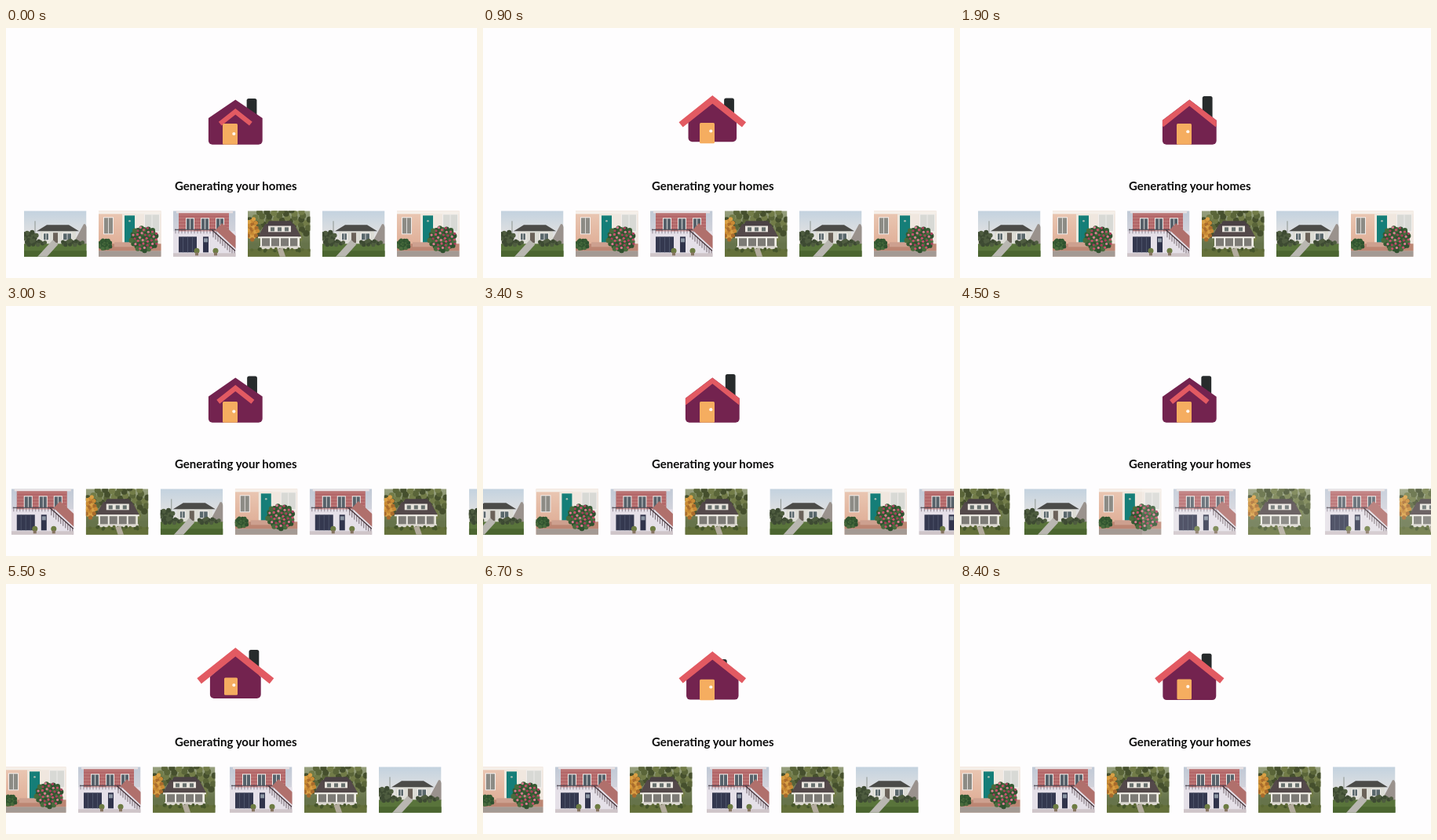
Write an HTML page with a canvas that moves like this. It is 600x319 px and loops after 8500 ms.

```html
<!DOCTYPE html>
<html lang="en">
<head>
<meta charset="utf-8">
<title>Generating your homes</title>
<style>
  html, body { margin: 0; width: 100%; height: 100%; overflow: hidden; background: #fefdfe; }
  canvas { display: block; width: 600px; height: 319px; }
  p {
    position: absolute; left: -7.2px; top: 192px; width: 600px; margin: 0;
    font: bold 15px/18px Lato, sans-serif; text-align: center; color: #0b0b0b;
  }
</style>
</head>
<body>
<canvas id="stage" width="600" height="319"></canvas>
<p>Generating your homes</p>
<script>
const ctx = document.getElementById('stage').getContext('2d');
const LOOP = 8500, BOUNCE = 1475, BACKGROUND = '#fefdfe';
const PHOTO_W = 79.5, PHOTO_H = 58.5, PHOTO_STEP = 95;

// Timing helpers
const ramp = (t, from, to) => Math.min(1, Math.max(0, (t - from) / (to - from)));
const easeOut = u => u * (2 - u);
const easeInOut = u => (1 - Math.cos(Math.PI * u)) / 2;
const pulse = (u, skew = 1) => Math.sin(Math.PI * u ** skew);

// Drawing helpers
function rect(color, x, y, w, h) {
  ctx.fillStyle = color;
  ctx.fillRect(x, y, w, h);
}
function rounded(color, x, y, w, h, radius) {
  ctx.fillStyle = color;
  ctx.beginPath();
  ctx.roundRect(x, y, w, h, radius);
  ctx.fill();
}
function dot(color, x, y, radius) {
  ctx.fillStyle = color;
  ctx.beginPath();
  ctx.arc(x, y, radius, 0, 7);
  ctx.fill();
}
// A slab whose upper edge is narrower than its lower one by `inset` on each side.
function roof(color, x, y, w, h, inset) {
  ctx.fillStyle = color;
  ctx.beginPath();
  ctx.moveTo(x + inset, y);
  ctx.lineTo(x + w - inset, y);
  ctx.lineTo(x + w, y + h);
  ctx.lineTo(x, y + h);
  ctx.fill();
}
function line(color, width, x1, y1, x2, y2) {
  ctx.strokeStyle = color;
  ctx.lineWidth = width;
  ctx.beginPath();
  ctx.moveTo(x1, y1);
  ctx.lineTo(x2, y2);
  ctx.stroke();
}
function backdrop(top, bottom) {
  const fill = ctx.createLinearGradient(0, 0, 0, 42);
  fill.addColorStop(0, top);
  fill.addColorStop(1, bottom);
  rect(fill, 0, 0, PHOTO_W, PHOTO_H);
}
// Leaves or petals spread in a sunflower spiral inside an ellipse.
function scatter(colors, count, cx, cy, rx, ry, size) {
  for (let i = 0; i < count; i++) {
    const r = Math.sqrt((i + 0.5) / count), angle = i * 2.4;
    dot(colors[i % colors.length], cx + Math.cos(angle) * r * rx, cy + Math.sin(angle) * r * ry, size);
  }
}
function pane(x, y, w, h, glass) {
  rect('#f3efed', x - 1, y - 1, w + 2, h + 2);
  rect(glass, x, y, w, h);
  rect('#f3efed', x + w / 2 - 0.4, y, 0.8, h);
}

const photos = {
  A() {
    backdrop('#c3d2df', '#ece6e2');
    const hedge = ['#3d4a32', '#4e5c3f'];
    line('#7d857c', 0.8, 14, 36, 14, 13);
    scatter(hedge, 14, 7, 33, 9, 7, 3);
    roof('#9a928d', 62, 17, 30, 26, 14);
    rect('#dcdcd5', 21, 25, 45, 17);
    roof('#4b4b48', 16, 18, 54, 8, 13);
    pane(25, 29, 6, 8, '#59676b');
    pane(50, 29, 10, 8, '#59676b');
    rect('#6b6259', 37, 28, 6, 13);
    rect('#59743b', 0, 42, 80, 17);
    rect('#4b6530', 0, 51, 80, 8);
    scatter(hedge, 16, 14, 41, 14, 3, 2.5);
    scatter(hedge, 16, 61, 41, 15, 3, 2.5);
    line('#b9b7b1', 9, 40, 40, 20, 62);
  },
  B() {
    backdrop('#eac8b4', '#e0b099');
    rect('#f0e7df', 47, 0, 33, 45);
    rect('#f5efe9', 0, 0, 80, 4);
    pane(7, 9, 11, 20, '#8c8b85');
    rect('#efe9df', 30, 4, 18, 39);
    rect('#157e78', 33, 6, 13, 36);
    dot('#a7bcb2', 39.5, 13, 1.3);
    pane(59, 5, 18, 21, '#d8d9d5');
    rect('#bc8673', 0, 42, 80, 9);
    rect('#cda08f', 20, 40, 29, 6);
    rect('#a49a94', 0, 51, 80, 8);
    const leaves = ['#496b3d', '#355a32', '#2f512f'];
    scatter(leaves, 32, 8, 43, 8, 6, 2.5);
    scatter(leaves, 55, 58, 36, 17, 15, 3.2);
    scatter(['#c9506f', '#d97c92', '#a83f5c'], 30, 59, 35, 17, 15, 1.6);
  },
  C() {
    backdrop('#c0c9d6', '#ddd8de');
    rect('#b4686a', 7, 2, 64, 29);
    for (let y = 5; y < 29; y += 4) rect('#c48783', 7, y, 64, 0.7);
    rect('#e8e0e2', 4, 0, 72, 3);
    rect('#e5e0e8', 0, 26, 80, 33);
    for (let x = 17; x < 60; x += 19) pane(x, 10, 9, 14, '#57616a');
    line('#433e46', 1, 2, 24, 60, 24);
    for (let x = 3; x < 60; x += 4) line('#5d5360', 0.6, x, 23, x, 29);
    rect('#34384f', 7, 33, 23, 20);
    for (let x = 12; x < 30; x += 6) rect('#535a70', x, 33, 0.8, 20);
    rect('#30334b', 38, 33, 7, 20);
    rect('#8b95a3', 39, 35, 5, 5);
    line('#b0706c', 12, 58, 20, 88, 48);
    line('#49383f', 1.4, 49, 24, 79, 51);
    for (let x = 51; x < 79; x += 3) line('#49383f', 0.7, x, x * 0.9 - 20, x, x * 0.9 - 12);
    rect('#cfc5c9', 0, 54, 80, 5);
    for (let x = 30; x <= 54; x += 24) {
      dot('#6d7c43', x, 51, 3.5);
      rect('#85745f', x - 2, 53, 4, 4);
    }
  },
  D() {
    backdrop('#97a07e', '#66734a');
    scatter(['#5a6539', '#727c48', '#454f2d'], 60, 43, 17, 42, 22, 4);
    scatter(['#c98a34', '#a96b2c', '#d9a045'], 24, 6, 24, 7, 14, 2.6);
    rect('#cfccc4', 17, 28, 47, 21);
    roof('#54494a', 13, 17, 55, 16, 9);
    rect('#e9e5de', 26, 19, 29, 8);
    roof('#4a4144', 23, 13, 36, 6, 4);
    for (let x = 29; x < 50; x += 9) rect('#68706e', x, 21, 5, 5);
    rect('#eeebe4', 13, 33, 55, 2);
    rect('#7d7b76', 18, 35, 45, 12);
    for (let x = 16; x < 66; x += 12) rect('#f1eee7', x, 34, 2, 16);
    rect('#dcd8d1', 15, 45, 52, 4);
    rect('#64703a', 0, 49, 80, 10);
    scatter(['#45542b', '#5c6936'], 22, 40, 50, 39, 2, 2);
    line('#b3ab9d', 7, 41, 48, 45, 60);
  }
};

// The strip is built from groups, each followed by a little extra space.
const strip = [];
let nextX = 23;
for (const [names, extra] of [['ABCDABCD', 13], ['ABCD', 3], ['ABCD', 3], ['CDA', 0]]) {
  for (const name of names) {
    strip.push({ name, x: nextX });
    nextX += PHOTO_STEP;
  }
  nextX += extra;
}
const travel = strip[13].x + 3;
const tailStart = strip[13].x + 55;

function drawPhoto(name, x, y) {
  ctx.save();
  ctx.translate(x, y);
  ctx.beginPath();
  ctx.rect(0, 0, PHOTO_W, PHOTO_H);
  ctx.clip();
  photos[name]();
  ctx.restore();
}

function drawStrip(time) {
  const progress = easeInOut(ramp(time, 2198, 5248));
  const shift = -travel * progress;
  const rightEdge = progress ? 600 : 590;
  for (const { name, x } of strip) {
    if (x + shift > -PHOTO_W && x + shift < rightEdge) drawPhoto(name, x + shift, 233.3);
  }
  // The tail of the strip fades in while it scrolls.
  ctx.globalAlpha = 1 - progress;
  rect(BACKGROUND, Math.max(0, tailStart + shift), 230, 600, 65);
  ctx.globalAlpha = 1;
}

function drawHouse(phase) {
  const grow = easeOut(ramp(phase, 0, 800)) - easeInOut(ramp(phase, 1125, BOUNCE));
  const pop = pulse(ramp(phase, 700, 1025), 2);
  const hop = pulse(ramp(phase, 1025, 1225), 0.5);
  const middle = 292.3;

  // The chimney swells, ducks behind the roof and springs out again.
  const swell = pulse(ramp(phase, 0, 850)), duck = pulse(ramp(phase, 650, 950));
  const rise = 0.5 + 0.25 * swell - 0.67 * duck + 0.4 * pop + 0.5 * hop;
  const chimneyTop = 96 - 12 * rise;
  rounded('#272b2c', 298 + 11.5 * easeOut(rise), chimneyTop, 12.8, 126 - chimneyTop, 2.5);

  const half = 34.4 - 3.9 * pop - 2 * hop;
  const left = middle - half, right = middle + half;
  const bottom = 148.7 - 3.7 * pop - 2.7 * hop;
  const eave = 115 + 3.5 * grow;
  ctx.save();
  ctx.fillStyle = '#73234f';
  ctx.beginPath();
  ctx.moveTo(middle, 91.5 - 3 * hop);
  ctx.lineTo(right, eave);
  ctx.arcTo(right, bottom, left, bottom, 5);
  ctx.arcTo(left, bottom, left, eave, 5);
  ctx.lineTo(left, eave);
  ctx.fill();

  // The roof stays inside the walls until it is nearly full size.
  if (grow < 0.85) ctx.clip();
  const span = 19.5 + 20.7 * grow + 6 * hop;
  const roofTop = 121 - 0.74 * span, roofEnd = roofTop + 0.8 * span;
  ctx.strokeStyle = '#e25a62';
  ctx.lineWidth = 4 + 0.105 * span;
  ctx.beginPath();
  ctx.moveTo(middle - span, roofEnd);
  ctx.lineTo(middle, roofTop);
  ctx.lineTo(middle + span, roofEnd);
  ctx.stroke();
  ctx.restore();

  const doorLeft = 276 + 2 * hop, doorTop = 122 - pop - 2.5 * hop;
  const doorBottom = 148.7 - 1.5 * pop - 7 * hop;
  rounded('#f5ad60', doorLeft, doorTop, 295 - doorLeft, doorBottom - doorTop, 1.5);
  dot('#fff6ed', 290.3, 135 - 3.5 * grow - 2.5 * hop, 2.1);
}

function draw(time) {
  rect(BACKGROUND, 0, 0, 600, 319);
  drawHouse(time % BOUNCE);
  drawStrip(time);
}

const start = performance.now();
function tick() {
  draw((performance.now() - start) % LOOP);
  requestAnimationFrame(tick);
}
tick();
</script>
</body>
</html>
```
